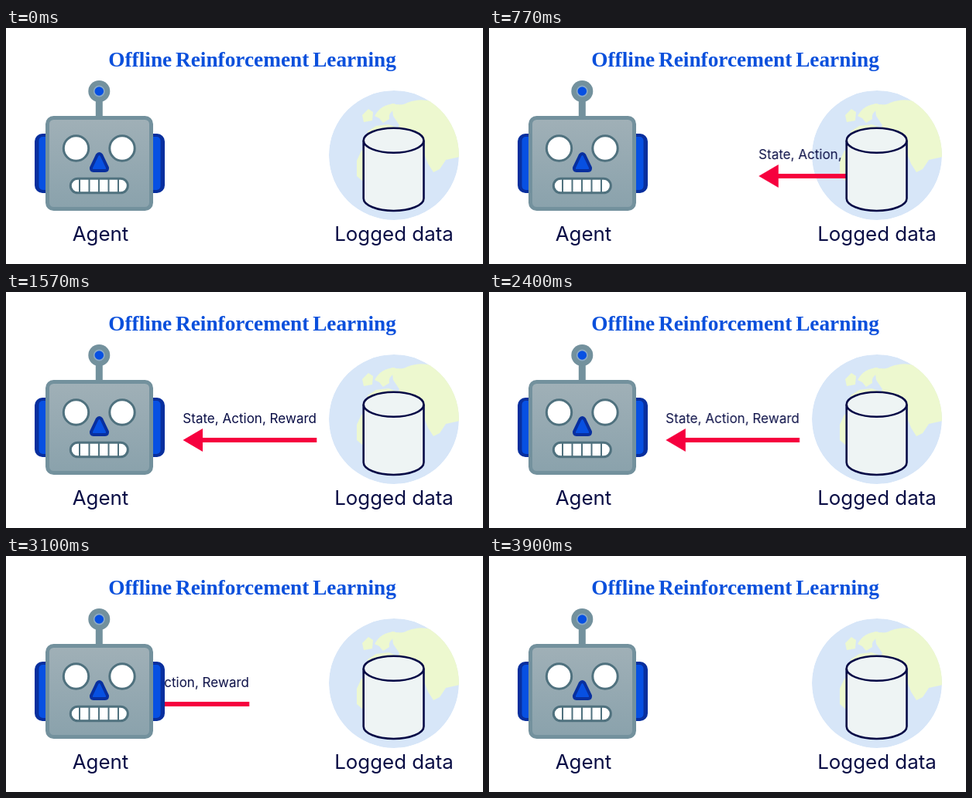
These frames come from a looping animation (616 px wide and 306 px high, 4000 ms). An HTML page:

```html
<!DOCTYPE html>
<html lang="en">
<head>
<meta charset="utf-8">
<title>Offline Reinforcement Learning</title>
<style>
  html, body { margin: 0; width: 100%; height: 100%; overflow: hidden; background: #fff; }
  svg { display: block; width: 616px; height: 306px; }
  text { fill: #090d45; font-family: Inter, "Open Sans", sans-serif; }
  .title { font: bold 27.3px "Liberation Serif", "Noto Serif", serif; word-spacing: -2px; fill: #0b50dc; }
  .label { font-size: 25.9px; text-anchor: middle; }
  .note { font-size: 17.05px; }
  .steel { stroke: #73919d; }
  .blue { fill: #0750e2; }
  .edge { fill: #082f9e; }
  .white { fill: #fff; stroke: #4f717e; stroke-width: 3; }
  .navy { fill: #eef4f4; stroke: #060a46; stroke-width: 2.6; }

  .message { animation: travel 4s infinite, vanish 4s step-end infinite; }
  /* eases in to the middle, rests, then eases on into the robot */
  @keyframes travel {
    0% { transform: translateX(234px); animation-timing-function: cubic-bezier(.333, 0, .667, 1); }
    39.17% { transform: none; animation-timing-function: linear; }
    59.28% { transform: none; animation-timing-function: cubic-bezier(.333, 0, .667, 1); }
    98.45%, 100% { transform: translateX(-194px); }
  }
  @keyframes vanish {
    0% { opacity: 1; }
    97.45%, 100% { opacity: 0; }
  }
</style>
</head>
<body>
<svg viewBox="0 0 616 306">
  <defs>
    <clipPath id="lane"><rect x="120" y="140" width="380" height="80"/></clipPath>
    <clipPath id="disc"><circle cx="501" cy="165" r="84"/></clipPath>
    <linearGradient id="metal" x1="0" y1="0" x2="0" y2="1">
      <stop offset="0" stop-color="#a0b0b7"/>
      <stop offset="1" stop-color="#8aa2ac"/>
    </linearGradient>
  </defs>

  <text class="title" x="132.3" y="50">Offline Reinforcement Learning</text>

  <g clip-path="url(#disc)">
    <circle cx="501" cy="165" r="84" fill="#d7e6f8"/>
    <g fill="#edf8cf">
      <path d="M498 98 Q512 101 518 97 Q536 90 552 96 L590 100 V166 L568 171 L560 183 L552 187 L545 176 L538 158 L500 140 L508 126 L500 114 Z"/>
      <path d="M476 114 Q484 99 502 98 L504 104 Q493 110 495 118 L487 123 L482 117 Z"/>
      <path d="M460 113 L468 105 L474 109 L473 120 L462 122 Z"/>
      <path d="M467 134 L478 127 L494 125 L508 130 L490 146 H466 Z"/>
      <path d="M453 172 L459 159 L470 156 V198 H460 L453 192 Z"/>
    </g>
  </g>

  <g clip-path="url(#lane)">
    <g class="message">
      <text class="note" x="228.3" y="170">State, Action, Reward</text>
      <path fill="#f6003e" d="M228.5 192 L254 177 V189 H401.3 V195 H254 V207 Z"/>
    </g>
  </g>

  <g class="navy">
    <path d="M461.7 146 V221 A38.9 16 0 0 0 539.5 221 V146"/>
    <ellipse cx="500.6" cy="145.8" rx="38.9" ry="16"/>
  </g>

  <g>
    <rect class="edge" x="37" y="137" width="168" height="77" rx="10"/>
    <rect class="blue" x="42.5" y="141" width="157" height="69" rx="5"/>
    <path class="steel" d="M120.3 92 V116" stroke-width="9"/>
    <circle cx="120.3" cy="82" r="14" fill="#73919d"/>
    <circle class="blue" cx="120.3" cy="82" r="6.6" stroke="#8caac6" stroke-width="1.6"/>
    <rect class="steel" x="53.5" y="116.5" width="134" height="118" rx="8" fill="url(#metal)" stroke-width="5"/>
    <circle class="white" cx="90.5" cy="156" r="16.2"/>
    <circle class="white" cx="150" cy="156" r="16.2"/>
    <path class="blue" stroke="#082f9e" stroke-width="4" stroke-linejoin="round"
      d="M117.6 165 Q120.5 161 123.4 165 L131 181 Q131.5 185 128 185 H113 Q109.5 185 110 181 Z"/>
    <rect class="white" x="83.3" y="195.2" width="74" height="18.6" rx="9.3"/>
    <path class="white" d="M95 195 V214 M107.5 195 V214 M120 195 V214 M132.5 195 V214 M145 195 V214" style="stroke-width:2"/>
  </g>

  <text class="label" x="122" y="276">Agent</text>
  <text class="label" x="501" y="276">Logged data</text>
</svg>
</body>
</html>
```
